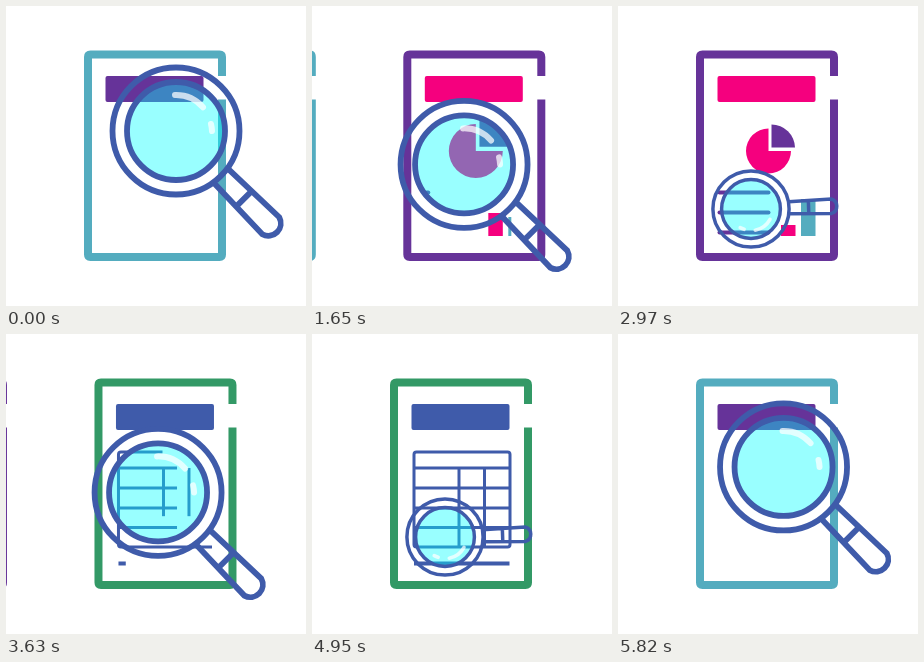
Recreate the animation shown at these times as an HTML page. Size 300 px wide and 300 px high, loop 5.85 s.

```html
<!DOCTYPE html>
<html lang="en">
<head>
<meta charset="utf-8">
<title>Document search</title>
<style>
  html, body { margin: 0; width: 100%; height: 100%; overflow: hidden; background: #fff; }
  svg { display: block; width: 100vw; height: 100vh; }
  .frame { fill: none; stroke-width: 8; stroke-linejoin: round; }
  .draw { fill: none; stroke-width: 4; }
  .round { stroke-linecap: round; }
  .glass { fill: none; stroke: #3f5baa; stroke-width: 5.8; }
  .shine { fill: none; stroke: #fff; stroke-opacity: .72; stroke-width: 6; stroke-linecap: round; }
  #table .draw { stroke-width: 3; }
</style>
</head>
<body>
<svg viewBox="0 0 300 300">
  <defs>
    <path id="page" class="frame" d="M216 70V51Q216 48.5 213.5 48.5H84.5Q82 48.5 82 51V248.5Q82 251 84.5 251H213.5Q216 251 216 248.5V93.5"/>
    <rect id="title" x="99.5" y="70" width="98" height="26" rx="2"/>
  </defs>

  <g class="doc" stroke="#663399">
    <use href="#page" stroke="#54acbf"/>
    <use href="#title" fill="#663399" stroke="none"/>
    <path class="draw" data-from="120" data-to="420" d="M104 129H132Q133.5 129 133.5 130.5V156.5Q133.5 158 132 158H104Q102.5 158 102.5 156.5V130.5Q102.5 129 104 129Z"/>
    <g class="round">
      <path class="draw" data-from="240" data-to="480" d="M150.5 133.5H200"/>
      <path class="draw" data-from="300" data-to="540" d="M150.5 145.5H200"/>
      <path class="draw" data-from="360" data-to="540" d="M150.5 156.5H176"/>
      <path class="draw" data-from="480" data-to="780" d="M101.5 186.5H200"/>
      <path class="draw" data-from="560" data-to="860" d="M101.5 206.5H200"/>
      <path class="draw" data-from="640" data-to="900" d="M101.5 226.5H160"/>
    </g>
  </g>

  <g class="doc" stroke="#663399">
    <use href="#page"/>
    <g stroke="none">
      <use href="#title" fill="#f5007e"/>
      <g id="pie">
        <path fill="#f5007e" d="M150.5 145V122.5A22.5 22.5 0 1 0 173 145Z"/>
        <path fill="#663399" d="M153.5 141.5V118.5A23.5 23.5 0 0 1 177 141.5Z"/>
      </g>
      <rect id="barA" x="163" fill="#f5007e"/>
      <rect id="barB" x="183" fill="#54acbf"/>
    </g>
    <g class="round">
      <path class="draw" data-from="1620" data-to="1920" d="M101.5 186.5H150.5"/>
      <path class="draw" data-from="1700" data-to="2000" d="M101.5 206.5H150.5"/>
      <path class="draw" data-from="1780" data-to="2080" d="M101.5 226.5H150.5"/>
    </g>
  </g>

  <g class="doc" stroke="#3f5baa">
    <use href="#page" stroke="#339966"/>
    <use href="#title" fill="#3f5baa" stroke="none"/>
    <g id="table"></g>
    <path class="draw" data-from="3570" data-to="3930" d="M102 229.5H197.5"/>
  </g>

  <g id="lens">
    <circle r="49" fill="#0ff" fill-opacity=".4"/>
    <g id="shine">
      <path class="shine" d="M-1 -36A36 36 0 0 1 27 -23.8"/>
      <path class="shine" d="M35 -7A36 36 0 0 1 36 0"/>
    </g>
    <circle class="glass" r="63.5"/>
    <circle class="glass" r="49"/>
    <path id="handle" class="glass" d="M63 -10L134 -12A12.5 12.5 0 0 1 134 12L63 10M96 -11V11"/>
  </g>
</svg>

<script>
const LOOP = 5850, CYCLE = 1980, STEP = 229.5;
const SLIDES = [1170, 3130, 5110], SLIDE_TIME = 680;
const $ = id => document.getElementById(id);
const clamp = v => Math.min(1, Math.max(0, v));
const mix = (a, b, u) => a + (b - a) * u;
const smooth = u => u * u * (3 - 2 * u);
const ramp = (t, from, to) => smooth(clamp((t - from) / (to - from)));

// time, x, y, scale, handle angle, highlight angle, eased arrival
const POSES = [
  [0, 170, 125, 1, 45, 0, 0],
  [120, 184, 111, 1, 45, 0, 1],
  [240, 160, 143, 1, 45, 0, 1],
  [450, 149, 144, 1, 45, 0, 1],
  [600, 149, 144, 1, 45, 0, 0],
  [960, 133, 203, .6, -2, 120, 1],
  [1200, 133, 203, .6, -2, 120, 0],
  [1440, 138, 189, 1, 45, 0, 1],
  [1650, 152, 158.5, 1, 45, 0, 0],
  [1860, 165.5, 133, 1, 45, 0, 0],
  [1980, 170, 125, 1, 45, 0, 0]
];

function addTableLine(d) {
  const line = document.createElementNS("http://www.w3.org/2000/svg", "path");
  line.setAttribute("class", "draw");
  line.setAttribute("d", d);
  line.dataset.from = 3390;
  line.dataset.to = 3810;
  $("table").append(line);
}
addTableLine("M195.5 213H104.5Q102 213 102 210.5V120.5Q102 118 104.5 118H195.5Q198 118 198 120.5V210.5Q198 213 195.5 213");
[134, 154, 174, 193.5].forEach(y => addTableLine(`M102 ${y}H198`));
[147, 172.5].forEach(x => addTableLine(`M${x} 134V213`));

const docs = [...document.querySelectorAll(".doc")];
const strokes = [...document.querySelectorAll(".draw")];
strokes.forEach(s => s.setAttribute("pathLength", 1));

// Cubic bezier (.33, 0, .21, 1), solved by bisection
function glide(x) {
  if (x <= 0 || x >= 1) return clamp(x);
  let lo = 0, hi = 1;
  for (let i = 0; i < 24; i++) {
    const s = (lo + hi) / 2, r = 1 - s;
    if (3 * r * r * s * .33 + 3 * r * s * s * .21 + s ** 3 < x) lo = s;
    else hi = s;
  }
  return smooth(lo);
}

function moveDocs(t) {
  const shift = SLIDES.reduce((sum, s) => sum + glide((t - s) / SLIDE_TIME), 0);
  docs.forEach((doc, i) => {
    const slot = i === 0 && shift > 1.5 ? 3 : i;
    doc.setAttribute("transform", `translate(${(slot - shift) * STEP})`);
  });
}

function drawContent(t) {
  // The first page comes back blank
  strokes.forEach(s => {
    const blank = docs[0].contains(s) && t > SLIDES[1];
    const u = blank ? 0 : ramp(t, +s.dataset.from, +s.dataset.to);
    s.style.display = u > 0 ? "" : "none";
    s.style.strokeDasharray = u < 1 ? `${u} 2` : "none";
  });
  // The pie overshoots, then settles
  const grow = 1.2 * ramp(t, 1340, 1640) - .2 * ramp(t, 1660, 1860);
  $("pie").setAttribute("transform", `translate(150.5 145) scale(${grow}) translate(-150.5 -145)`);
  setBar("barA", 14.5 * ramp(t, 1500, 1630), mix(23, 11, ramp(t, 1680, 2100)));
  setBar("barB", 14.5 * ramp(t, 1610, 1750), mix(19, 37, ramp(t, 1650, 2050)));
}

function setBar(id, width, height) {
  const bar = $(id);
  bar.setAttribute("width", width);
  bar.setAttribute("height", height);
  bar.setAttribute("y", 230 - height);
}

function moveLens(t) {
  const p = t % CYCLE;
  const i = POSES.findIndex(k => k[0] > p);
  const a = POSES[i - 1], b = POSES[i];
  const raw = (p - a[0]) / (b[0] - a[0]);
  const u = b[6] ? smooth(raw) : raw;
  const [x, y, scale, angle, shine] = [1, 2, 3, 4, 5].map(n => mix(a[n], b[n], u));
  $("lens").setAttribute("transform", `translate(${x} ${y}) scale(${scale})`);
  $("handle").setAttribute("transform", `rotate(${angle})`);
  $("shine").setAttribute("transform", `rotate(${shine})`);
}

const start = performance.now();
function render(now) {
  const t = Math.max(0, now - start) % LOOP;
  moveDocs(t);
  drawContent(t);
  moveLens(t);
  requestAnimationFrame(render);
}
render(start);
</script>
</body>
</html>
```
